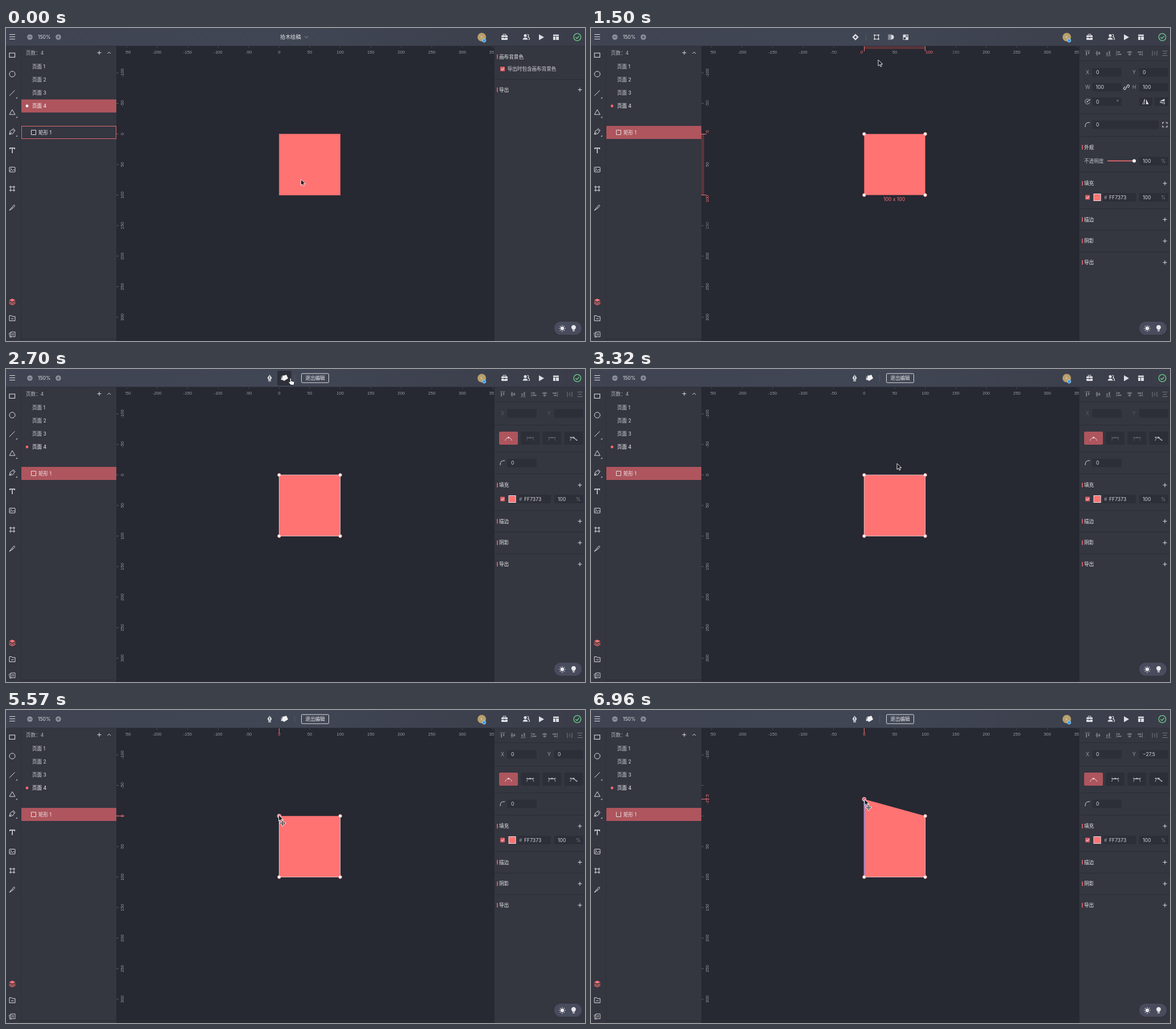
Write an HTML page that moves like this. It is 1018 by 550 pixels and loops after 8 s.

```html
<!DOCTYPE html>
<html lang="zh-CN">
<head>
<meta charset="utf-8">
<title>Vector editing</title>
<style>
html, body { margin: 0; width: 100%; height: 100%; overflow: hidden; background: #262832; }
svg { display: block; width: 100vw; height: 100vh; }
text { font: 8.6px Inter, "Noto Sans CJK SC", "Noto Sans CJK JP", sans-serif; white-space: pre; }
.ruler { font: 7.6px "Liberation Sans", Arial, sans-serif; text-anchor: middle; }
.mid { text-anchor: middle; }
</style>
</head>
<body>
<svg id="stage" viewBox="0 0 1018 550"></svg>
<script>
const RED = '#ff7373', ROW = '#ae555d', ICON = '#dddee3', DIM = '#989ba6', FAINT = '#5d606b';
const PANEL = '#343640', FIELD = '#2d2f38', LINE = '#2a2c35';
const UNIT = 1.0733, OX = 480.3, OY = 186.2;
const sx = v => OX + v * UNIT, sy = v => OY + v * UNIT;

const rect = (x, y, w, h, fill, more = '') => `<rect x="${x}" y="${y}" width="${w}" height="${h}" fill="${fill}" ${more}/>`;
const path = (d, stroke = ICON, w = 1, fill = 'none') => `<path d="${d}" stroke="${stroke}" stroke-width="${w}" fill="${fill}"/>`;
const solid = (d, fill = ICON) => path(d, 'none', 0, fill);
const dot = (x, y, r, fill, more = '') => `<circle cx="${x}" cy="${y}" r="${r}" fill="${fill}" ${more}/>`;
const ring = (x, y, r, stroke = ICON, w = 1) => dot(x, y, r, 'none', `stroke="${stroke}" stroke-width="${w}"`);
const text = (x, y, s, fill = ICON, more = '') => `<text x="${x}" y="${y + 3.1}" fill="${fill}" ${more}>${s}</text>`;
const at = (x, y, s) => `<g transform="translate(${x} ${y})">${s}</g>`;
const on = (flags, s) => `<g data-on="${flags}">${s}</g>`;
const plus = (x, y, r = 3.5) => path(`M${x - r} ${y}h${2 * r}M${x} ${y - r}v${2 * r}`);
const rule = y => rect(859, y, 159, 1, LINE);
const field = (x, y, w = 52, h = 15) => rect(x, y - h / 2, w, h, FIELD, 'rx="1.5"');
const check = y => rect(869, y - 4, 8, 8, '#dd6268', 'rx="1"') + path(`M870.8 ${y}l1.8 1.8l3-3.4`, '#fff');
const section = (y, s, add = true) => rect(863, y - 4, 1.6, 8, '#e8696c') + text(867, y, s, '#eeeef1') + (add ? plus(1009, y) : '');

function topBar() {
  return rect(0, 0, 1018, 32, 'url(#bar)') + rect(0, 31, 1018, 1, '#30333d') +
    path('M6 11.5h10M6 15.5h10M6 19.5h10') +
    dot(42, 16, 4.8, '#8d909b') + path('M39.5 16h5', '#3d414e') +
    text(56, 16, '150%') +
    dot(92, 16, 4.8, '#8d909b') + path('M89.5 16h5M92 13.5v5', '#3d414e') +
    dot(836.5, 16, 7.5, '#b79f6c') + text(836, 15, 'x', '#e9dfc8', 'class="mid" style="font-size:6px"') +
    dot(840.6, 22, 3, '#2e9bf0', 'stroke="#d9ecfb" stroke-width=".7"') +
    rect(871, 13, 11, 8, ICON, 'rx="1"') + path('M874 13v-2h5v2') + path('M871 16.5h4M878 16.5h4', '#3d414e') + rect(875.3, 15.5, 2.4, 2.4, '#3d414e') +
    dot(913, 13.3, 2.6, ICON) + solid('M908.6 20.5c0-5 8.8-5 8.8 0z') + path('M916.5 11c3 0 3 4.6 0.6 4.6c2.4 0 3.4 2 3.4 4.4h-2', ICON, 1.1) +
    solid('M937 11l9 5.2l-9 5.3z') +
    rect(962, 11.5, 10, 2.6, ICON) + rect(962, 15, 4, 6, ICON) + rect(967, 15, 5, 6, ICON) +
    rect(985, 0, 1, 32, '#383b46') +
    ring(1004.5, 16, 6.3, '#6cd08a', 1.3) + path('M1001.3 16.2l2.4 2.3l4.2-4.6', '#6cd08a', 1.3) +
    on('page', text(482, 15.7, '拾木绘稿', '#e6e7eb', 'style="font-size:9.2px"') + path('M525 14.5l3 3l3-3', DIM)) +
    on('select',
      on('hoverEdit', rect(489, 3, 26, 26, '#2d3039', 'rx="2"')) +
      path('M465 12l4 4l-4 4l-4-4z', ICON, 2.4) +
      rect(483, 11, 1, 11, '#555966') +
      rect(498.5, 12.5, 7, 7, 'none', `stroke="${ICON}"`) +
      [[498.5, 12.5], [505.5, 12.5], [498.5, 19.5], [505.5, 19.5]].map(([x, y]) => rect(x - 1.2, y - 1.2, 2.4, 2.4, ICON)).join('') +
      rect(522, 11, 7, 10, '#7d808b', 'rx="1"') + dot(528.5, 16, 4, ICON) + solid('M528 12a4 4 0 0 0 0 8z', '#8f929c') +
      rect(548.5, 11.5, 9.5, 9.5, ICON, 'rx="1"') + rect(549.5, 16.5, 3.7, 3.7, '#3d414e') + path('M553 13.2h3.3v3.3M556 13.5l-3 3', '#3d414e')) +
    on('edit',
      on('hoverFill', rect(477, 3, 24.5, 26, '#2d3039', 'rx="2"')) +
      solid('M463.5 10l3.8 5.2l-1.8 4h-4l-1.8-4zM461 20h5v1.6h-5z') + path('M463.5 11.5v4', '#3d414e', .8) + dot(463.5, 16, 1, '#3d414e') +
      solid('M486.5 12.5l6.5-2.5l3 6.5l-7.2 4.5l-4-3.4z', '#f2f2f4') + path('M484.5 17c-1.5-4 2-6 5-5.4', ICON, .9) + dot(485, 18.2, 1.4, ICON) +
      rect(507, 10, 1, 12, '#555966') +
      rect(519.5, 8, 48, 16, 'none', 'rx="1.5" stroke="#dcdde2"') + text(543.5, 16, '退出编辑', '#eeeef1', 'class="mid"'));
}

function toolBar() {
  const corner = y => solid(`M20 ${y - 3}v3h-3z`, '#a9abb4');
  return rect(0, 32, 27, 518, PANEL) + rect(26.5, 32, 1, 518, LINE) +
    rect(6, 44, 9.6, 7.4, 'none', `stroke="${ICON}" stroke-width="1.1"`) +
    ring(11, 81, 5) + path('M6 119l9.5-9.5') + corner(124) +
    path('M11 143.5l5 8.5h-10z') + corner(158) +
    path('M6 187l1.5-6l4-2.6l3.2 3.2l-2.6 4zM6 187l4-4M11.5 178.4l1.3-1.6l3.3 3.4l-1.5 1.4') + corner(191) +
    path('M6.8 213v-2h8.4v2M11 211v9', ICON, 1.5) +
    rect(6, 244.5, 10, 8.5, 'none', `stroke="${ICON}" rx="1"`) + path('M6.5 251.5l3-2.6l2 1.6l2-2l2.4 2.2', ICON, .9) + dot(8.8, 247.3, .9, ICON) +
    path('M8 277v10.5M14 277v10.5M5.8 279.3h10.4M5.8 285.2h10.4') +
    path('M6 320.5l4.5-5.8l1.8 1.7zM11 314l3.2-3.2l1.6 1.6l-3 3.4') +
    solid('M11 475.5l5.5 2.8l-5.5 2.8l-5.5-2.8z', RED) + path('M5.5 481l5.5 2.8l5.5-2.8M5.5 483.7l5.5 2.8l5.5-2.8', RED, 1.2) +
    path('M6 514.5v-9h4l1 1.5h5v7.5zM9 511h4.5') +
    path('M8.5 534h7.5v8.5h-7.5zM8.5 535.5l-3 .8l1.4 7l3-.4M10.5 537h3.5M10.5 539.5h3.5', ICON, .9);
}

function layerPanel() {
  const page = (n, i) => text(46, 68 + i * 23, '页面 ' + n, '#d8d9de');
  return rect(27, 32, 167, 518, PANEL) + rect(27, 546, 831, 1, LINE) +
    text(35, 43.5, '页数：4', '#b4b6bf') + plus(164, 43.5) + path('M178.5 45l2.8-2.8l2.8 2.8') +
    [1, 2, 3].map(page).join('') +
    on('page', rect(27, 125.5, 167, 23, ROW) + dot(37, 137, 2.4, '#fff') +
      rect(27.5, 172.5, 166, 22, 'none', 'stroke="#e0696c"')) +
    on('select edit', dot(37, 137, 2.4, '#f2696b') + rect(27, 172, 167, 23, ROW)) +
    text(46, 137, '页面 4', '#fff') +
    '<path id="thumb" fill="none" stroke="#e6e0e4"/>' + text(57, 183.5, '矩形 1', '#f0eaec');
}

function rulers() {
  const row = [], col = [];
  for (let v = -250; v <= 350; v += 50) {
    row.push(rect(sx(v) - .5, 32, 1, 3, '#454853') + text(sx(v), 42, v, DIM, `class="ruler" data-axis="0" data-v="${v}"`));
    if (v >= -100 && v <= 300) col.push(rect(194, sy(v) - .5, 4, 1, '#5a5d68') + turned(sy(v), v, DIM, `data-axis="1" data-v="${v}"`));
  }
  return `<g clip-path="url(#rowClip)">${row.join('')}</g>` + col.join('') +
    on('select',
      rect(480, 32, 107.5, 5, '#593439') + path('M480.5 32v9M587.5 32v9', RED) +
      text(475.8, 42, '0', RED, 'class="ruler"') + text(594.6, 42, '100', RED, 'class="ruler"') +
      rect(194, 186, 5, 107.5, '#593439') + path('M194 186.5h9M194 293.5h9', RED) +
      turned(182, '0', RED) + turned(300, '100', RED)) +
    on('node',
      `<g id="markX">${path('M0 32v9', RED)}${text(0, 42, '', RED, 'class="ruler"')}</g>` +
      `<g id="markY">${path('M194 0h14', RED)}${turned(0, '', RED)}</g>`);
}
function turned(y, s, fill, more = '') {
  return `<text class="ruler" transform="translate(207.3 ${y}) rotate(-90)" fill="${fill}" ${more}>${s}</text>`;
}

function fillRow(y) {
  return check(y) + rect(884, y - 6, 12, 12, RED, 'stroke="#f4e4e6"') +
    field(900, y, 58) + text(902, y, '#', DIM) + text(911, y, 'FF7373', '#d8d9de') + percent(y);
}
function percent(y) {
  return field(964, y, 51) + text(970, y, '100', '#d8d9de') + text(1002, y, '%', '#7c7f8a');
}
function effects(y) {
  return section(y, '填充') + fillRow(y + 24.5) + rule(y + 44) + section(y + 63.5, '描边') + rule(y + 82) +
    section(y + 101.3, '阴影') + rule(y + 120) + section(y + 139, '导出');
}
function aligns() {
  const c = '#767984', bars = path('M-4.5-4.5h9', c) + rect(-3, -3, 2.2, 7, c) + rect(1, -3, 2.2, 4.5, c);
  const mid = path('M-4.5 0h9', c) + rect(-3, -4, 2.2, 8, c) + rect(1, -2.5, 2.2, 5, c);
  const spin = (x, a, s) => `<g transform="translate(${x} 44.3) rotate(${a})">${s}</g>`;
  return spin(873, 0, bars) + spin(891.5, 0, mid) + spin(909.5, 180, bars) + spin(928.5, -90, bars) +
    spin(947, 90, mid) + spin(965, 90, bars) + path('M987 40v9M995 40v9M991 41.5v6', c) +
    path('M1004.5 40.5h9M1004.5 48.5h9M1006 44.5h6', c, 1.2) + rule(57);
}
function curveButton(i) {
  const x = 867 + i * 38.2, c = i ? '#b9bbc4' : '#f1dadd';
  const arms = [['M-6 4q1.5-5 6-5.5q4.5 .5 6 5.5', ''], ['M-6 4q0-5 6-5.5q6 .5 6 5.5', 'M-6-1.5h12'],
    ['M-6 4q0-5 6-5.5q6 .5 6 5.5', 'M-6-1.5h12'], ['M-6 4q1-5 5-5.5l6 5', 'M-6-2h5l6 4']][i];
  const tip = i ? dot(-5.5, -1.6, 1.1, c) + dot(5.5, i == 3 ? 3 : -1.6, 1.1, c) : '';
  return rect(x, 110, 33, 23, i ? FIELD : ROW, 'rx="2"') +
    `<g ${i == 1 || i == 2 ? 'data-dim' : ''}>` + at(x + 16.5, 122, path(arms[0] + arms[1], c, .9) + tip + dot(0, -1.5, 1.6, c)) + '</g>';
}
function sidePanel() {
  const label = (x, y, s) => text(x, y, s, '#9b9ea8'), value = (x, y, s, id) => text(x, y, s, '#d8d9de', id ? `id="${id}"` : '');
  const corner = y => path(`M869 ${y + 4}v-1.5q0-6.5 6.5-6.5h1.5`);
  return rect(858, 32, 160, 518, PANEL) + rect(858, 32, 1, 518, LINE) +
    on('page', section(50.5, '画布背景色', false) + check(72) + text(881.5, 72, '导出时包含画布背景色', '#d8d9de') + rule(90) + section(108.5, '导出')) +
    on('select edit', aligns() + field(881, 78) + field(964, 78, 51)) +
    on('select',
      label(870, 78, 'X') + value(888, 78, 0) + label(952, 78, 'Y') + value(970, 78, 0) +
      label(869, 104, 'W') + field(881, 104) + value(887.5, 104, 100) + label(952, 104, 'H') + field(964, 104, 51) + value(970, 104, 100) +
      path('M941 106l-1.4 1.4a1.8 1.8 0 0 1-2.6-2.6l2-2M942 102l1.4-1.4a1.8 1.8 0 0 1 2.6 2.6l-2 2M940 105.5l3-3', ICON, 1.1) +
      path('M876.5 127a4.3 4.3 0 1 0 .5 3.5M877 124.5v3h-3', '#b4b6bf') + dot(872.8, 129.3, 1.4, '#b4b6bf') +
      field(881, 129.5) + value(888, 129.5, 0) + text(924, 129.5, '°', DIM) +
      field(964, 129.5, 23) + field(991, 129.5, 24) +
      path('M973.5 125v8.5h-3.5z', ICON, .8) + solid('M976 125v9h4.5z') +
      solid('M999.5 128.5l9-4v4z') + path('M1000 130.5h8.5v3z', ICON, .8) + rule(150) +
      corner(170) + field(881, 170, 117) + value(888, 170, 0) +
      path('M1005 168.5v-2.5h2.5M1010.5 166h2.5v2.5M1013 171.5v2.5h-2.5M1007.5 174h-2.5v-2.5', ICON, 1.2) + rule(190) +
      section(209.5, '外观', false) + text(867, 234, '不透明度', '#c0c2ca') + path('M908 233.5h46', RED, 1.5) + dot(955, 233.5, 3, '#fff') +
      percent(234) + rule(253) + effects(273)) +
    on('edit',
      `<g data-dim>${label(870, 78, 'X')}${label(952, 78, 'Y')}</g>` +
      on('node', value(888, 78, 0, 'valX') + value(970, 78, 0, 'valY')) + rule(98) +
      [0, 1, 2, 3].map(curveButton).join('') + rule(145) +
      corner(165) + field(881, 165) + value(888, 165, 0) + rule(184) + effects(204));
}

function themePill() {
  let rays = '';
  for (let i = 0; i < 8; i++) rays += `<g transform="rotate(${i * 45})">${path('M0-4.3v-1.6', '#e8e8ec', 1.1)}</g>`;
  return rect(964, 516, 48, 23, '#494c5d', 'rx="11.5"') + at(978, 527.8, dot(0, 0, 3.2, '#e8e8ec') + rays) +
    solid('M998 522a4 4 0 0 1 2.2 7.3v1.2h-4.4v-1.2a4 4 0 0 1 2.2-7.3zM996.2 531.4h3.6v1.7h-3.6z', '#e8e8ec');
}

function artwork() {
  const knob = (x, y) => dot(sx(x), sy(y), 2.8, '#fff', 'stroke="#f08a8a" stroke-width=".8"');
  return `<path id="shape" fill="${RED}"/>` +
    on('page', rect(480.5, 186.5, 107, 107, 'none', 'stroke="#d96668" stroke-width="1.2"')) +
    on('edit', '<path id="outline" fill="none" stroke="#ffd0d0" stroke-width=".9"/>') +
    on('guide', path(`M${OX} 157V293`, '#6f8df2', 1.2)) +
    on('select edit', knob(100, 0) + knob(100, 100) + knob(0, 100)) +
    on('select plain', knob(0, 0)) +
    on('over', dot(OX, OY, 3.3, '#f2606a')) +
    on('node', `<circle id="node" r="3.2" fill="#f0566a" stroke="#ffe3e5" stroke-width="1"/>`) +
    on('select', text(533, 301.3, '100 x 100', RED, 'class="mid"'));
}

function pointer() {
  const arrow = path('M0 0v10.6l2.5-2.3l1.7 3.7l1.8-.8l-1.7-3.6h3.5z', '#fff', .9, '#15161a');
  const hand = path('M-1.3 1c0-1.6 2.3-1.6 2.3 0v3.6l4 .8c1.2.3 1.5 1 1.4 2l-.6 4.2h-5.6l-3.6-4.2c-.9-1.4.6-2.2 1.6-1.2l.5.5z', '#17181c', .8, '#fff');
  const move = 'M-3.8 0h7.6M0-3.8v7.6M-2.5-1.3l-1.4 1.3l1.4 1.3M2.5-1.3l1.4 1.3l-1.4 1.3M-1.3-2.5l1.3-1.4l1.3 1.4M-1.3 2.5l1.3 1.4l1.3-1.4';
  return `<g id="pointer">${on('hand', hand)}${on('arrow', arrow)}${on('drag', at(7, 14.3, path(move, '#fff', 2.6) + path(move, '#17181c', 1)))}</g>`;
}

const stage = document.getElementById('stage');
stage.innerHTML = `<defs><linearGradient id="bar"><stop stop-color="#404452"/><stop offset=".5" stop-color="#414654"/><stop offset="1" stop-color="#3a3d49"/></linearGradient>
  <clipPath id="rowClip"><rect x="210" y="32" width="648" height="18"/></clipPath></defs>` +
  rect(0, 0, 1018, 550, '#262832') + rulers() + artwork() + toolBar() + layerPanel() + sidePanel() + topBar() + themePill() +
  on('tip', rect(483, 36, 38, 20, '#4b4f5e', 'rx="2"') + text(502, 45.8, '编辑', '#eeeef1', 'class="mid"')) + pointer();

// time, visible flags, pointer x, y, dragged corner x, y
const steps = [
  [0, 'page arrow', 518.5, 266],
  [900, 'select arrow', 518.5, 266],
  [1140, 'select arrow', 518, 232],
  [1310, 'select arrow', 512, 142],
  [1480, 'select arrow', 505, 56],
  [1650, 'select hoverEdit hand', 500.5, 16.5],
  [2100, 'select hoverEdit tip hand', 500.5, 16.5],
  [2700, 'edit plain hoverFill hand', 500.5, 16.5],
  [2990, 'edit plain arrow', 532, 42],
  [3150, 'edit plain arrow', 575, 104],
  [3310, 'edit plain arrow', 538, 166],
  [3470, 'edit plain arrow', 495, 189],
  [3920, 'edit plain arrow', 490, 188],
  [4070, 'edit plain arrow', 483, 187],
  [4220, 'edit over arrow', 477.5, 185.5],
  [4370, 'edit over arrow', 478.5, 185],
  [4520, 'edit over arrow', 479.5, 184.5],
  [4820, 'edit node arrow', 479.5, 184.5],
  [5570, 'edit node drag arrow', 479.5, 184.5],
  [5720, 'edit node drag arrow', 482, 177, 2, -8],
  [5860, 'edit node drag arrow', 485, 165.5, 4.5, -19],
  [6010, 'edit node drag arrow', 486.5, 152.5, 6, -31.5],
  [6160, 'edit node drag arrow', 486, 147.5, 5.5, -36.5],
  [6640, 'edit node drag arrow', 484, 150.5, 3.5, -33.5],
  [6800, 'edit node drag arrow', 482, 155, 1.5, -29.5],
  [6960, 'edit node drag guide arrow', 481, 157, 0, -27.5]
];

const byId = id => document.getElementById(id);
const layers = [...stage.querySelectorAll('[data-on]')].map(el => [el, el.dataset.on.split(' ')]);
const dims = stage.querySelectorAll('[data-dim]');
const labels = stage.querySelectorAll('[data-axis]');

function show([, names, x, y, px = 0, py = 0]) {
  const flags = names.split(' '), has = f => flags.includes(f);
  for (const [el, list] of layers) el.style.display = list.some(has) ? '' : 'none';
  dims.forEach(el => el.style.opacity = has('node') ? 1 : .35);

  // grey ruler labels give way to nearby red ones
  for (const el of labels) {
    const marks = has('select') ? [-4, 107] : has('node') ? [el.dataset.axis == 0 ? px : py] : [];
    const gap = Math.min(99, ...marks.map(m => Math.abs(m - el.dataset.v)));
    el.style.opacity = Math.max(0, Math.min(1, (gap - 26) / 24));
  }

  const X = sx(px), Y = sy(py), right = sx(100), low = sy(100);
  byId('pointer').setAttribute('transform', `translate(${x} ${y})`);
  byId('shape').setAttribute('d', `M${X} ${Y}L${right} ${OY}V${low}H${OX}z`);
  byId('outline').setAttribute('d', `M${X} ${Y}L${OX} ${low}H${right}V${OY}` + (has('plain') ? 'z' : ''));
  byId('node').setAttribute('cx', X);
  byId('node').setAttribute('cy', Y);
  byId('thumb').setAttribute('d', py ? 'M44.5 179v8.5h8v-8.5' : 'M44.5 179.5h8v8h-8z');
  byId('markX').setAttribute('transform', `translate(${X} 0)`);
  byId('markY').setAttribute('transform', `translate(0 ${Y})`);
  byId('markX').lastChild.textContent = px;
  byId('markY').lastChild.textContent = py;
  byId('valX').textContent = px;
  byId('valY').textContent = String(py).replace('-', '−');
}

let current;
function tick() {
  const t = performance.now() % 8000;
  const step = steps.findLast(s => s[0] <= t);
  if (step !== current) show(current = step);
  requestAnimationFrame(tick);
}
tick();
</script>
</body>
</html>
```
